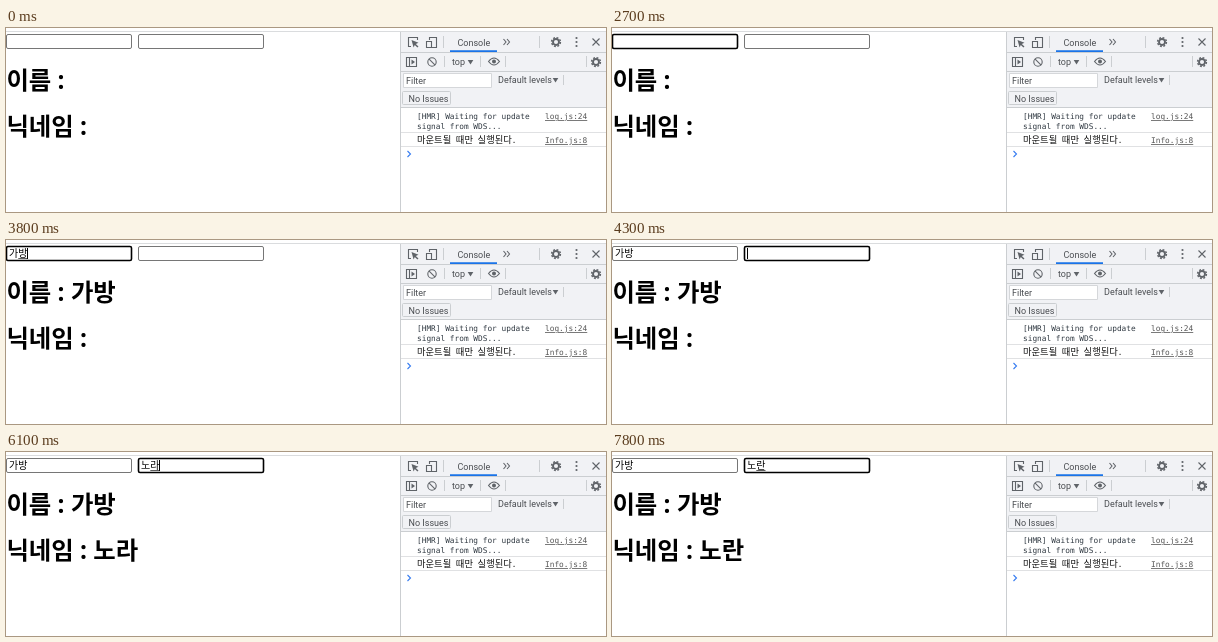
These frames come from a looping animation (600x184 px, 8 s). An HTML page:

```html
<!DOCTYPE html>
<html lang="ko">
<head>
<meta charset="utf-8">
<title>Input demo</title>
<style>
  html, body { margin: 0; width: 100%; height: 100%; overflow: hidden; background: #fff; }
  svg { display: block; width: 600px; height: 184px; }
  text { white-space: pre; }
  .title { font: 700 24.4px "Noto Sans", "Noto Sans CJK KR", sans-serif; }
  .value { font: 10px "Noto Sans CJK KR", sans-serif; }
  .field { fill: #fff; stroke: #767676; }
  .field.hover { stroke: #404040; }
  .field.focus { stroke: #000; stroke-width: 1.6; }
  .ui { font: 9px Roboto, sans-serif; fill: #4a4d51; }
  .log { font: 7.8px "DejaVu Sans Mono", monospace; fill: #303942; }
  .korean { font: 9.3px "Noto Sans Mono CJK KR", "Noto Sans CJK KR", monospace; fill: #111; }
  .link { text-decoration: underline; fill: #555; }
  .icon { fill: none; stroke: #5f6368; stroke-width: 1.1; }
  .solid { fill: #5f6368; }
  .rule { fill: none; stroke: #cbced1; }
</style>
</head>
<body>
<svg viewBox="0 0 600 184">
  <path class="rule" stroke-opacity=".7" d="M0 3.5H600"/>

  <g id="fields"></g>
  <text id="nameTitle" class="title" x=".4" y="60.5"></text>
  <text id="nickTitle" class="title" x=".4" y="106.5"></text>
  <path id="underline" stroke="#333" stroke-width=".8"/>
  <path id="caret" stroke="#000"/>

  <!-- developer tools panel -->
  <path fill="#f1f2f5" d="M394 4H600V79H394z"/>
  <path class="rule" d="M394.5 4V184M394 24.5H600M394 43.5H600M394 79.5H600"/>
  <path class="rule" d="M437.5 8V20M533.5 8V20M438.5 28V39M474.5 28V39M499.5 28V39M557.5 47V57M580.5 28V39"/>
  <path class="rule" stroke-opacity=".6" d="M395 104.5H600M395 118.5H600"/>

  <defs>
    <g id="gear" class="icon">
      <circle r="3" stroke-width="1.9"/>
      <circle r="4.4" stroke-width="1.5" stroke-dasharray="1.9 1.556"/>
    </g>
    <path id="arrow" class="solid" d="M-2.8 -2H2.8L0 2.5z"/>
  </defs>

  <path class="icon" d="M405 18.5H402.5V9.5H411.5V12"/>
  <path class="solid" d="M405.5 12L412.5 14.8L409.8 15.9L412.5 18.6L411.4 19.6L408.8 17L407.6 19.5z"/>
  <path class="icon" d="M423.5 12V9.5H430.5V19.5H426M420.5 13.5H425.5V19.5H420.5z"/>
  <text class="ui" x="451.5" y="17.5">Console</text>
  <path fill="#1a73e8" d="M444 22.3H491V24H444z"/>
  <path class="icon" d="M497.5 11L500 14L497.5 17M501 11L503.5 14L501 17"/>
  <use href="#gear" x="550" y="14"/>
  <g class="solid">
    <circle cx="570.5" cy="10" r="1.1"/><circle cx="570.5" cy="14" r="1.1"/><circle cx="570.5" cy="18" r="1.1"/>
  </g>
  <path class="icon" d="M586.5 10.5L593.5 17.5M593.5 10.5L586.5 17.5"/>

  <path class="icon" d="M400.5 29.5H410.5V38.5H400.5zM403.5 29.5V38.5"/>
  <path class="solid" d="M405.5 31.5L409 34L405.5 36.5z"/>
  <path class="icon" d="M422.9 30.9L429.1 37.1"/>
  <circle class="icon" cx="426" cy="34" r="4.2"/>
  <text class="ui" x="446" y="37">top</text>
  <use href="#arrow" x="464.5" y="34"/>
  <path class="icon" d="M482.5 33.5Q488 26.5 493.5 33.5Q488 40.5 482.5 33.5z"/>
  <circle class="solid" cx="488" cy="33.5" r="2"/>
  <use href="#gear" x="590" y="34"/>

  <path fill="#fff" stroke="#d5d7da" d="M397.5 45.5H485.5V59.5H397.5z"/>
  <text class="ui" x="400" y="55.5">Filter</text>
  <text class="ui" x="492" y="55">Default levels</text>
  <use href="#arrow" x="549.5" y="52"/>
  <rect class="rule" x="396.5" y="63.5" width="48" height="13" rx="1"/>
  <text class="ui" x="402.5" y="73.5">No Issues</text>

  <g class="log">
    <text x="411" y="91">[HMR] Waiting for update</text>
    <text x="411" y="101">signal from WDS...</text>
    <text class="link" x="539" y="91">log.js:24</text>
    <text class="korean" x="411" y="115">마운트될 때만 실행된다.</text>
    <text class="link" x="539" y="115">Info.js:8</text>
  </g>
  <path fill="none" stroke="#367cf1" stroke-width="1.1" d="M401.5 123L404.5 126L401.5 129"/>
</svg>

<script>
const LOOP = 8000;
const ADVANCE = 9.2; // width of one syllable in a field
const PADDING = 2.6;
const $ = id => document.getElementById(id);

// Each track lists [start in ms, value].
const nameTrack = [[0, ''], [2800, 'ㄱ'], [2900, '가'], [3600, '갑'], [3700, '가바'], [3800, '가방']];
const nickTrack = [[0, ''], [5700, 'ㄴ'], [5800, '노'], [6000, '놀'], [6100, '노라'], [6200, '노란']];
const hoverTrack = [[0, -1], [500, 0], [800, -1]];
const focusTrack = [[0, -1], [800, 0], [4300, 1]];
const caretTrack = [[0, 0], [800, 1], [1300, 0], [1900, 1], [2400, 0], [2800, 1], [3400, 0],
  [3600, 1], [4800, 0], [5400, 1], [6700, 0], [7300, 1], [7800, 0]];
const valueAt = (track, t) => track.findLast(([start]) => start <= t)[1];

const fieldX = [0.5, 132.5];
$('fields').innerHTML = fieldX.map(x =>
  `<rect class="field" x="${x}" y="6.5" width="125" height="14" rx="1.5"/>
   <text class="value" x="${x + PADDING}" y="17.3"></text>`).join('');
const boxes = document.querySelectorAll('.field');
const values = document.querySelectorAll('.value');

function render(t) {
  const texts = [valueAt(nameTrack, t), valueAt(nickTrack, t)];
  const hover = valueAt(hoverTrack, t);
  const focus = valueAt(focusTrack, t);

  texts.forEach((text, i) => {
    values[i].textContent = text;
    boxes[i].classList.toggle('hover', i === hover);
    boxes[i].classList.toggle('focus', i === focus);
  });
  $('nameTitle').textContent = '이름 : ' + texts[0];
  $('nickTitle').textContent = '닉네임 : ' + texts[1];

  const length = focus < 0 ? 0 : texts[focus].length;
  const end = focus < 0 ? 0 : fieldX[focus] + PADDING + length * ADVANCE;
  const caretX = Math.floor(end) + 0.5;
  $('caret').setAttribute('d', valueAt(caretTrack, t) ? `M${caretX} 8V19` : '');
  $('underline').setAttribute('d', length ? `M${end - ADVANCE} 18.5H${end}` : '');
}

function tick() {
  render(performance.now() % LOOP);
  requestAnimationFrame(tick);
}
tick();
</script>
</body>
</html>
```
